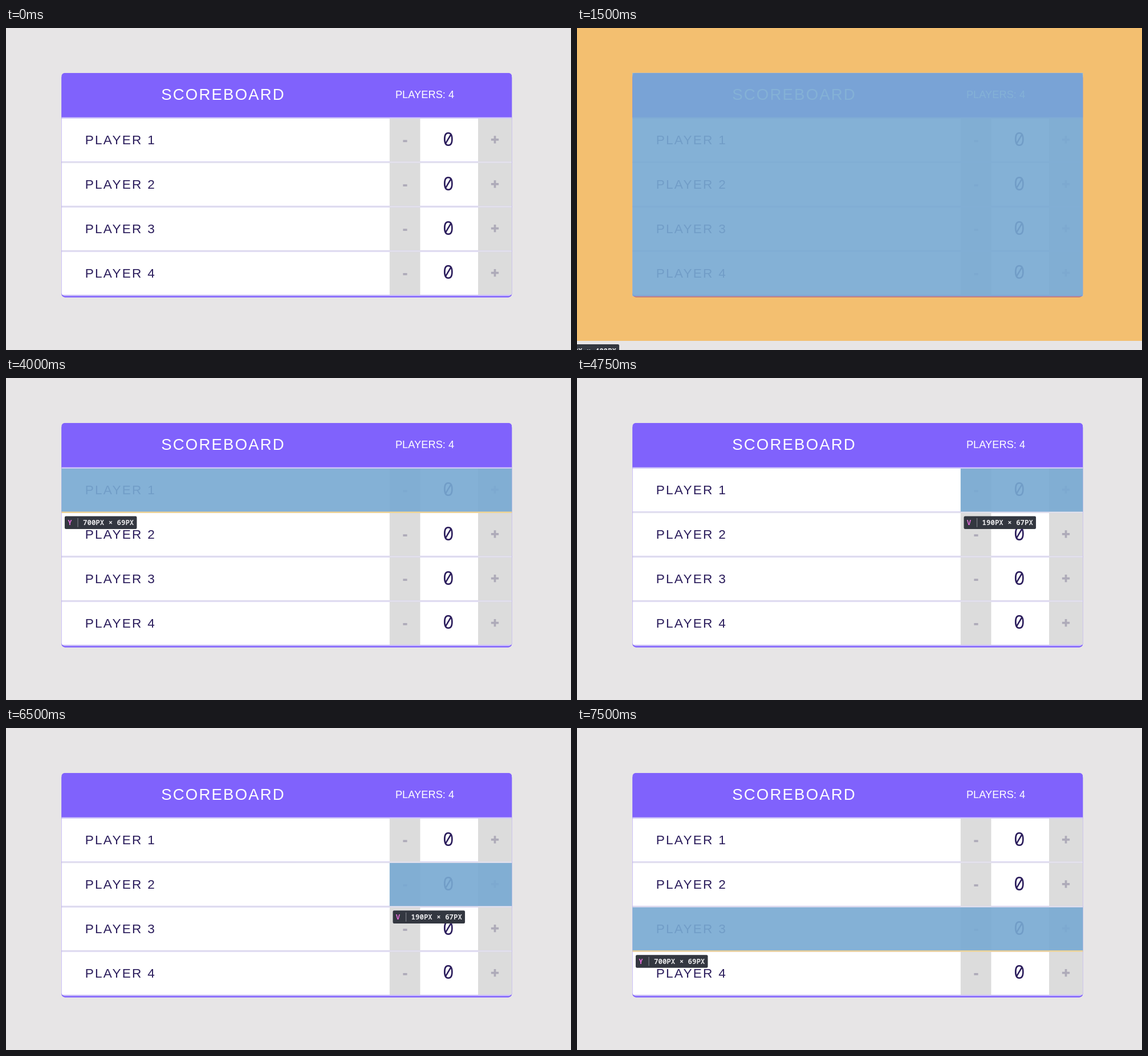
These frames come from a looping animation (991 by 565 pixels, 8000 ms). An HTML page:

```html
<!DOCTYPE html>
<html lang="en">
<head>
<meta charset="utf-8">
<title>Scoreboard</title>
<style>
  html, body { margin: 0; width: 100%; height: 100%; overflow: hidden; background: #e7e5e6; }
  svg { display: block; width: 100%; height: 100%; }
  text { font-family: "Liberation Sans", Arial, sans-serif; white-space: pre; }
  .title { font-size: 24.4px; letter-spacing: 1.95px; fill: #fff; }
  .stat { font-size: 16.2px; fill: #fff; }
  .name { font-size: 20px; letter-spacing: 2px; fill: #2b1d5c; }
  .score { font: 500 29px "Noto Sans Mono", monospace; fill: #2b1d5c; text-anchor: middle; }
  .tip { font: bold 11px "Noto Sans Mono", monospace; fill: #e6e6e8; }
  .tip.tag { fill: #e56ddb; }
  .content { fill: rgba(120, 170, 210, .91); }
  .padding { fill: rgba(77, 200, 0, .51); }
  .border { fill: rgba(255, 200, 50, .51); }
  .margin { fill: rgba(255, 155, 0, .51); }
</style>
</head>
<body>
<svg viewBox="0 0 991 565">
  <clipPath id="card"><rect width="700" height="347" rx="5.5"/></clipPath>
  <g transform="translate(97.3 78.8) scale(1.1286)">
    <rect y="2" width="700" height="347" rx="5.5" fill="#8062fc"/>
    <g id="board" clip-path="url(#card)"></g>
    <g id="overlay"></g>
  </g>
</svg>
<script>
const HEAD = 71, ROW = 69, LINE = 2, LOOP = 8000;

const rect = (x, y, w, h, attrs) =>
  `<rect x="${x}" y="${y}" width="${w}" height="${h}" ${attrs}/>`;
const fill = color => `fill="${color}"`;
const part = name => `class="${name}"`;
const text = (x, y, cls, str) => `<text x="${x}" y="${y}" class="${cls}">${str}</text>`;
const rowTop = i => HEAD + i * ROW;

function row(i) {
  const y = rowTop(i), h = ROW - LINE;
  return rect(0, y, 700, h, fill("#fff")) +
    rect(510, y, 47.5, h, fill("#dcdcdc")) +
    rect(647.5, y, 52.5, h, fill("#dcdcdc")) +
    rect(0, y + h, 700, LINE, fill(i < 3 ? "#e9e9ea" : "#d3caf8")) +
    text(36.7, y + 40.2, "name", `PLAYER ${i + 1}`) +
    text(601.1, y + 42.4, "score", "0") +
    `<path d="M530.8 ${y + 34.9}h6.4M667.7 ${y + 32.8}h11.8m-5.9 -5.9v11.8" stroke="#aeabb9" stroke-width="3.3"/>`;
}

// Inspector label: component tag, divider and size
function tip(x, y, tag, size) {
  return rect(x, y, 32.9 + 6.6 * size.length, 20, 'rx="2" fill="#333740"') +
    text(x + 4.6, y + 14, "tip tag", tag) +
    rect(x + 20, y + 3, .9, 14, fill("#888a92")) +
    text(x + 28.4, y + 14, "tip", size);
}

const app = () =>
  '<path class="margin" fill-rule="evenodd" d="M-87 -70H793V416.7H-87ZM0 0H700V347H0Z"/>' +
  rect(0, 0, 700, 347, part("content")) +
  tip(-139.3, 422, "A", "700PX × 400PX");

const header = () =>
  '<path class="padding" fill-rule="evenodd" d="M0 0H700V69H0ZM10 5H690V64H10Z"/>' +
  rect(10, 5, 680, 59, part("content")) +
  rect(0, 69, 700, LINE, part("border")) +
  tip(5, HEAD + 5, "M", "700PX × 71PX");

const player = i =>
  rect(0, rowTop(i), 700, ROW - LINE, part("content")) +
  rect(0, rowTop(i + 1) - LINE, 700, LINE, part("border")) +
  tip(5, rowTop(i + 1) + 5, "Y", "700PX × 69PX");

const counter = i =>
  rect(510, rowTop(i), 190, ROW - LINE, part("content")) +
  tip(515, rowTop(i + 1) + 5, "V", "190PX × 67PX");

const steps = [
  [0, ""], [1500, app()], [3000, header()],
  [4000, player(0)], [4750, counter(0)],
  [5750, player(1)], [6500, counter(1)],
  [7500, player(2)]
];

board.innerHTML =
  rect(0, 0, 700, 69, fill("#8062fc")) +
  rect(0, 69, 700, LINE, fill("#d3caf8")) +
  text(155, 42.2, "title", "SCOREBOARD") +
  text(518.9, 39, "stat", "PLAYERS: 4") +
  [0, 1, 2, 3].map(row).join("");

const overlay = document.getElementById("overlay");
let shown, start;

function frame(now) {
  start ??= now;
  const t = (now - start) % LOOP;
  const step = steps.findLast(([at]) => at <= t);
  if (step !== shown) overlay.innerHTML = (shown = step)[1];
  requestAnimationFrame(frame);
}
requestAnimationFrame(frame);
</script>
</body>
</html>
```
